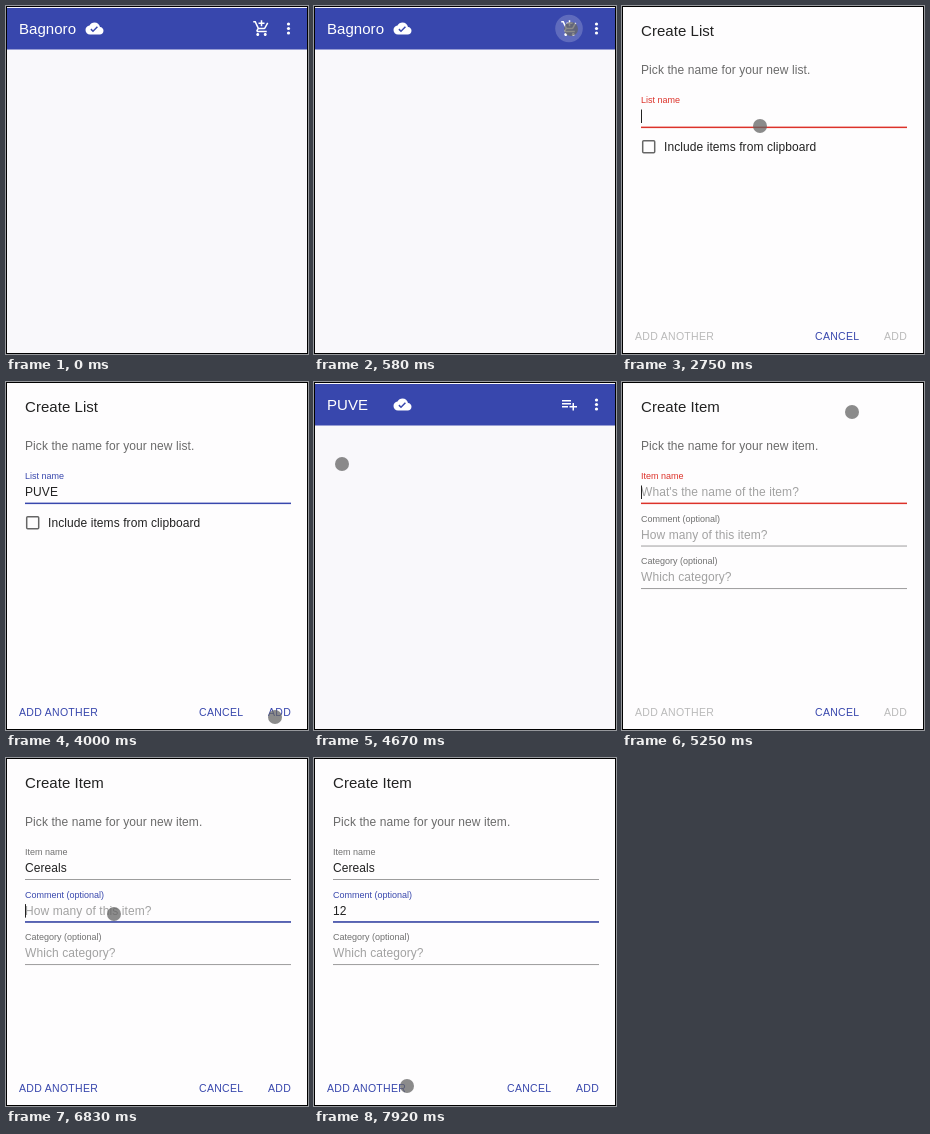
An HTML page that plays this animation: 302x348 px, repeating every 8 s.

```html
<!DOCTYPE html>
<html lang="en">
<head>
<meta charset="utf-8">
<title>Shopping list demo</title>
<style>
html, body { margin: 0; width: 100%; height: 100%; overflow: hidden; background: #fff; }
svg { display: block; width: 100%; height: 100%; font-family: "Liberation Sans", Arial, sans-serif; }
text { white-space: pre; }
</style>
</head>
<body>
<svg id="stage" viewBox="0 0 302 348" xmlns="http://www.w3.org/2000/svg"></svg>
<script>
const LOOP = 8000, FPS = 12;
const BLUE = [56, 71, 173], RED = [220, 50, 42], GREY = [112, 112, 112], OFF = [186, 186, 186];
const INK = '#222', HINT = '#a2a2a2';

const ICON = {
  cloud: 'M19.35 10.04C18.67 6.59 15.64 4 12 4 9.11 4 6.6 5.64 5.35 8.04 2.34 8.36 0 10.91 0 14c0 3.31 2.69 6 6 6h13c2.76 0 5-2.24 5-5 0-2.64-2.05-4.78-4.65-4.96zM10 17l-3.5-3.5 1.41-1.41L10 14.17 15.18 9l1.41 1.41L10 17z',
  cart: 'M11 9h2V6h3V4h-3V1h-2v3H8v2h3v3zm-4 9c-1.1 0-1.99.9-1.99 2S5.9 22 7 22s2-.9 2-2-.9-2-2-2zm10 0c-1.1 0-1.99.9-1.99 2s.89 2 1.99 2 2-.9 2-2-.9-2-2-2zm-9.83-3.25l.03-.12.9-1.63h7.45c.75 0 1.41-.41 1.75-1.03l3.86-7.01L19.42 4h-.01l-1.1 2-2.76 5H8.53l-.13-.27L6.16 6l-.95-2-.94-2H1v2h2l3.6 7.59-1.35 2.45c-.16.28-.25.61-.25.96 0 1.1.9 2 2 2h12v-2H7.42c-.13 0-.25-.11-.25-.25z',
  addItem: 'M14 10H2v2h12v-2zm0-4H2v2h12V6zm4 8v-4h-2v4h-4v2h4v4h2v-4h4v-2h-4zM2 16h8v-2H2v2z'
};

// Typed text: [time, value] pairs; every entry also restarts the caret blink.
const LIST_NAME = [[750, ''], [1000, 'L'], [1250, 'Lu'], [1420, 'Lub'], [1580, 'Lubi'], [2170, ''], [2670, ''],
  [2920, 'P'], [3080, 'PU'], [3250, 'PUV'], [3500, 'PUVE']];
const ITEM_NAME = [[5250, ''], [5580, 'C'], [5750, 'Ce'], [5830, 'Cer'], [5920, 'Cere'], [6170, 'Cerea'], [6250, 'Cereals']];
const COMMENT = [[6670, ''], [7000, '1'], [7080, '12']];

// Each track is one visible stretch of the pointer: end time and [time, x, y] stops.
const POINTER = [
  [1000, [[80, 21, 37], [500, 257, 23]]],
  [2920, [[1670, 201, 250], [1920, 80, 333], [2420, 80, 333], [2670, 138, 120]]],
  [5580, [[3500, 160, 180], [3670, 255, 340], [3830, 269, 335], [4080, 269, 335], [4420, 40, 137], [4580, 40, 137],
    [4670, 28, 82], [5080, 244, 26], [5170, 244, 26], [5250, 230, 30]]],
  [7000, [[6420, 170, 104], [6670, 108, 156]]],
  [LOOP, [[7250, 108, 142], [7500, 268, 338], [7830, 93, 328]]]
];

const stage = document.getElementById('stage');
const measure = document.createElement('canvas').getContext('2d');
measure.font = '12px "Liberation Sans", Arial, sans-serif';

const progress = (t, start, span) => Math.max(0, Math.min(1, (t - start) / span));
const lerp = (a, b, p) => a + (b - a) * p;
const smooth = p => p * p * (3 - 2 * p);
const mix = (a, b, p) => a.map((v, i) => lerp(v, b[i], p));
const rgb = c => Array.isArray(c) ? `rgb(${c.map(Math.round)})` : c;

const text = (x, y, size, fill, str, spacing = 0) =>
  `<text x="${x}" y="${y}" font-size="${size}" fill="${rgb(fill)}" letter-spacing="${spacing}">${str}</text>`;
const rect = (x, y, w, h, fill) => `<rect x="${x}" y="${y}" width="${w}" height="${h}" fill="${rgb(fill)}"/>`;
const circle = (x, y, r, fill, opacity = 1) =>
  `<circle cx="${x}" cy="${y}" r="${r}" fill="${fill}" opacity="${opacity}"/>`;
const icon = (name, x) => `<path transform="translate(${x} 13.5) scale(.75)" fill="#fff" d="${ICON[name]}"/>`;
const body = (x, y, fill, str) => text(x, y, 12, fill, str, 0.08);
const typed = (keys, t) => keys.filter(k => k[0] <= t).pop() || [0, ''];

function appScreen(t) {
  const opened = t >= 4670;
  let out = rect(1, 1, 300, 346, '#f9f8fb') + rect(1, 2, 300, 41.5, BLUE);
  out += text(13, 27.5, 15, '#fff', opened ? 'PUVE' : 'Bagnoro', 0.05);
  out += icon('cloud', 79.5) + icon(opened ? 'addItem' : 'cart', 246.5);
  for (const dy of [-4.5, 0, 4.5]) out += circle(282.5, 22.5 + dy, 1.6, '#fff');
  if (t >= 4080 && !opened) out += body(20, 80, INK, 'Lubi') + body(20, 134, INK, 'PUVE');
  if (t >= 490 && t < 750) out += circle(255, 22.5, lerp(8, 18, progress(t, 490, 170)), '#fff', 0.2);
  return out;
}

function field(t, y, f) {
  const [since, value] = f.keys ? typed(f.keys, t) : [0, ''];
  const color = f.color || GREY;
  const drop = f.drop || 0;
  let out = text(19, y + 17 * drop, 9 + 3 * drop, color, f.label);
  if (value) out += body(19, y + 17, INK, value);
  else if (f.hint) out += body(19, y + 17, HINT, f.hint);
  out += rect(19, y + 24, 266, 0.85, '#8c8c8c');
  const half = 133 * (f.line || 0);
  if (half) out += rect(152 - half, y + 23.6, 2 * half, 1.5, color);
  if (f.focus && (t - since) % 1000 < 500) {
    const x = 19 + measure.measureText(value).width + value.length * 0.08;
    out += rect(x, y + 6.5, 1, 13.5, INK);
  }
  return out;
}

function dialog(title, prompt, enabled) {
  const action = mix(OFF, BLUE, enabled);
  const button = (x, fill, str) => text(x, 334, 10.5, fill, str, 0.3);
  return rect(1, 1, 300, 346, '#fefdfe') + text(19, 30, 15, INK, title, 0.05) + body(19, 68, '#6b6b6b', prompt) +
    button(13, action, 'ADD ANOTHER') + button(193, BLUE, 'CANCEL') + button(262, action, 'ADD');
}

function listDialog(t) {
  const cleared = t >= 2170 && t < 2920;
  const valid = cleared ? 1 - progress(t, 2130, 120) : progress(t, t < 2170 ? 960 : 2880, 120);
  const drop = progress(t, 2130, 120) - progress(t, 2630, 120);
  return dialog('Create List', 'Pick the name for your new list.', valid) +
    field(t, 97, {
      label: 'List name', keys: LIST_NAME, color: mix(RED, BLUE, valid),
      line: 1, drop, focus: t < 2080 || t >= 2670
    }) +
    '<rect x="20.7" y="134.7" width="12" height="12" rx="1" fill="none" stroke="#666" stroke-width="1.5"/>' +
    body(42, 145, INK, 'Include items from clipboard');
}

function itemDialog(t) {
  const valid = progress(t, 5540, 200);
  const moved = progress(t, 6630, 150);
  return dialog('Create Item', 'Pick the name for your new item.', valid) +
    field(t, 97, {
      label: 'Item name', hint: "What's the name of the item?", keys: ITEM_NAME,
      color: mix(mix(RED, BLUE, valid), GREY, moved), line: 1 - moved, focus: t < 6670
    }) +
    field(t, 139.6, {
      label: 'Comment (optional)', hint: 'How many of this item?', keys: COMMENT,
      color: mix(GREY, BLUE, moved), line: moved, focus: t >= 6670
    }) +
    field(t, 182.2, { label: 'Category (optional)', hint: 'Which category?' });
}

function pointer(t) {
  const track = POINTER.find(([end, stops]) => t >= stops[0][0] && t < end);
  if (!track) return '';
  const stops = track[1];
  const i = stops.filter(s => s[0] <= t).length - 1;
  const a = stops[i], b = stops[i + 1] || a;
  const p = smooth(progress(t, a[0], b[0] - a[0] || 1));
  return circle(lerp(a[1], b[1], p), lerp(a[2], b[2], p), 7, '#636363', 0.74);
}

function render(t) {
  const screen = t >= 5250 ? itemDialog : t >= 750 && t < 4080 ? listDialog : appScreen;
  stage.innerHTML = screen(t) + pointer(t) +
    '<rect x=".5" y=".5" width="301" height="347" fill="none" stroke="#000"/>';
}

let shown = -1;
function tick() {
  const step = Math.floor((performance.now() % LOOP + 5) * FPS / 1000) % (LOOP * FPS / 1000);
  if (step !== shown) {
    shown = step;
    render(step * 1000 / FPS + 5);
  }
  requestAnimationFrame(tick);
}
tick();
</script>
</body>
</html>
```
